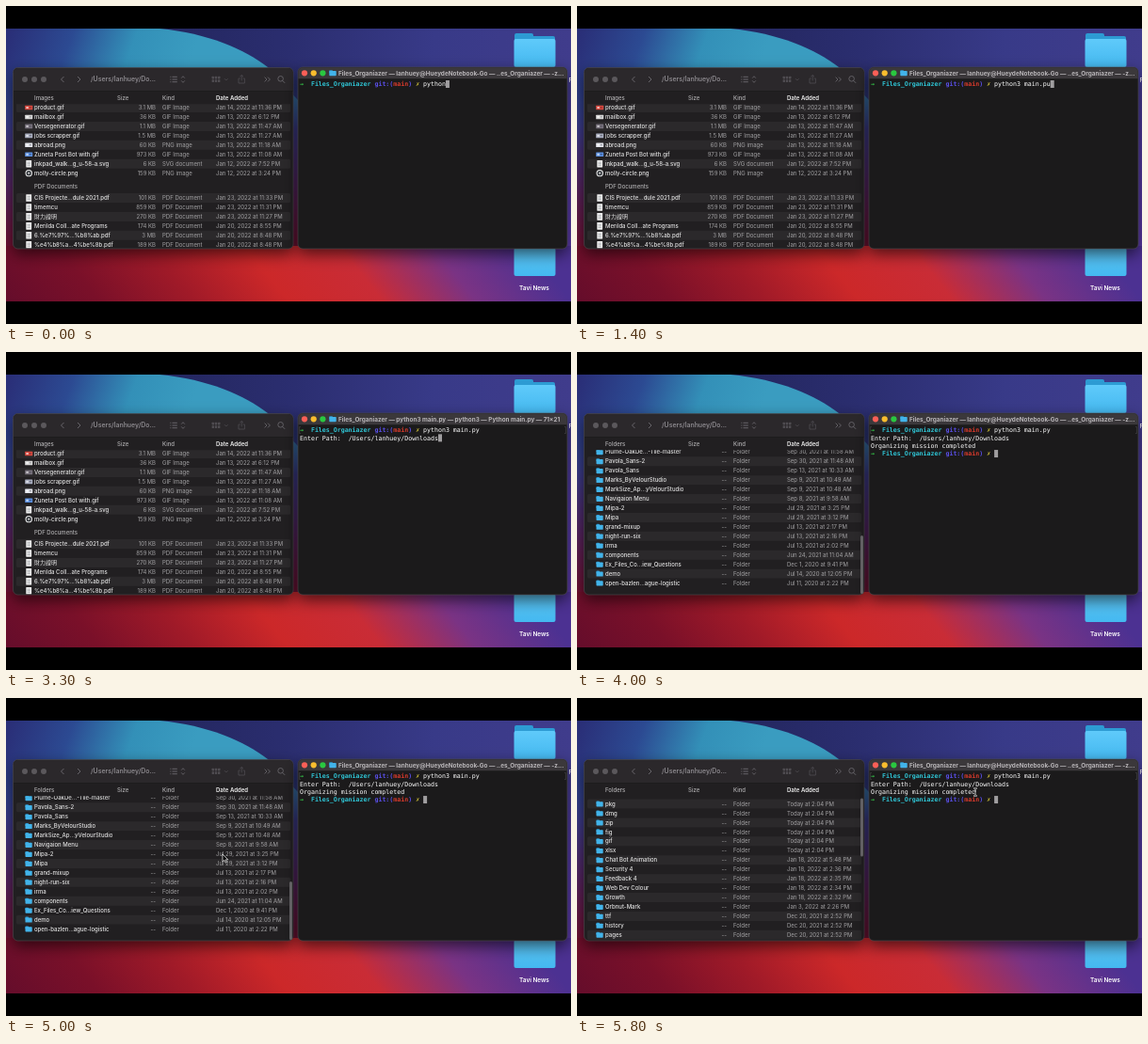
Recreate the animation shown at these times as an HTML page with a canvas. Size 600 by 338 pixels, loop 5.9 s.

```html
<!DOCTYPE html>
<html lang="en">
<head>
<meta charset="utf-8">
<title>Files organizer</title>
<style>
html, body { margin: 0; width: 100%; height: 100%; overflow: hidden; background: #000; }
canvas { display: block; width: 600px; height: 338px; }
</style>
</head>
<body>
<canvas id="stage"></canvas>
<script>
const canvas = document.getElementById('stage'), g = canvas.getContext('2d');
const dpr = window.devicePixelRatio || 1;
canvas.width = 600 * dpr;
canvas.height = 338 * dpr;

const LOOP = 5900, PITCH = 9.95, SCROLL_MAX = 215.2;
const SANS = 'Inter, "Noto Sans CJK TC", "Noto Sans CJK", sans-serif';
const MONO = '"DejaVu Sans Mono", monospace';
const FOLDER = '#42b4ea';

// name | size | kind | date | icon colour
const images = `product.gif|3.1 MB|GIF Image|Jan 14, 2022 at 11:36 PM|#d9473d
mailbox.gif|36 KB|GIF Image|Jan 13, 2022 at 6:12 PM|#d8d8d8
Versegenerator.gif|1.1 MB|GIF Image|Jan 13, 2022 at 11:47 AM|#77717c
jobs scrapper.gif|1.5 MB|GIF Image|Jan 13, 2022 at 11:27 AM|#a9aec0
abroad.png|60 KB|PNG image|Jan 13, 2022 at 11:18 AM|#e6e8ef
Zuneta Post Bot with.gif|973 KB|GIF Image|Jan 13, 2022 at 11:08 AM|#5a8fe0
inkpad_walk...g_u-58-a.svg|6 KB|SVG document|Jan 12, 2022 at 7:52 PM|page
molly-circle.png|159 KB|PNG image|Jan 12, 2022 at 3:24 PM|ring`;
const pdfs = `CIS Projecte...dule 2021.pdf|101 KB|Jan 23, 2022 at 11:33 PM
timemcu|859 KB|Jan 23, 2022 at 11:31 PM
財力證明|270 KB|Jan 23, 2022 at 11:27 PM
Merilda Coll...ate Programs|174 KB|Jan 20, 2022 at 8:55 PM
6.%e7%97%...%b8%ab.pdf|3 MB|Jan 20, 2022 at 8:48 PM
%e4%b8%a...4%be%8b.pdf|189 KB|Jan 20, 2022 at 8:48 PM`;
const folders = `pkg|Today at 2:04 PM
dmg|Today at 2:04 PM
zip|Today at 2:04 PM
fig|Today at 2:04 PM
gif|Today at 2:04 PM
xlsx|Today at 2:04 PM
Chat Bot Animation|Jan 18, 2022 at 5:48 PM
Security 4|Jan 18, 2022 at 2:36 PM
Feedback 4|Jan 18, 2022 at 2:35 PM
Web Dev Colour|Jan 18, 2022 at 2:34 PM
Growth|Jan 18, 2022 at 2:32 PM
Orbnut-Mark|Jan 3, 2022 at 2:26 PM
ttf|Dec 20, 2021 at 2:52 PM
history|Dec 20, 2021 at 2:52 PM
pages|Dec 20, 2021 at 2:52 PM
styles|Dec 20, 2021 at 2:52 PM
assets|Dec 20, 2021 at 2:52 PM
icons|Nov 18, 2021 at 4:10 PM
layout|Nov 2, 2021 at 1:25 PM
drafts|Oct 21, 2021 at 9:40 AM
notes|Oct 8, 2021 at 3:16 PM
Plume-OakDe...-Tile-master|Sep 30, 2021 at 11:58 AM
Pavola_Sans-2|Sep 30, 2021 at 11:48 AM
Pavola_Sans|Sep 13, 2021 at 10:33 AM
Marks_ByVelourStudio|Sep 9, 2021 at 10:49 AM
MarkSize_Ap...yVelourStudio|Sep 9, 2021 at 10:48 AM
Navigaion Menu|Sep 8, 2021 at 9:58 AM
Mipa-2|Jul 29, 2021 at 3:25 PM
Mipa|Jul 29, 2021 at 3:12 PM
grand-mixup|Jul 13, 2021 at 2:17 PM
night-run-six|Jul 13, 2021 at 2:16 PM
irma|Jul 13, 2021 at 2:02 PM
components|Jun 24, 2021 at 11:04 AM
Ex_Files_Co...iew_Questions|Dec 1, 2020 at 9:41 PM
demo|Jul 14, 2020 at 12:05 PM
open-bazlen...ague-logistic|Jul 11, 2020 at 2:22 PM`;
const rows = s => s.split('\n').map(line => line.split('|'));
const imageRows = rows(images), pdfRows = rows(pdfs), folderRows = rows(folders);

const clamp = (v, a = 0, b = 1) => Math.min(b, Math.max(a, v));
const ease = v => { v = clamp(v); return v * v * (3 - 2 * v); };

// y is the optical middle of the line
function text(s, x, y, { size = 6, color = '#dcdcdc', weight = 400, align = 'left', font = SANS } = {}) {
  g.font = `${weight} ${size}px ${font}`;
  g.fillStyle = color;
  g.textAlign = align;
  g.fillText(s, x, y + size * 0.36);
}
function box(x, y, w, h, color, r = 0) {
  g.fillStyle = color;
  g.beginPath();
  g.roundRect(x, y, w, h, r);
  g.fill();
}
function dot(x, y, r, color) {
  g.fillStyle = color;
  g.beginPath();
  g.arc(x, y, r, 0, 7);
  g.fill();
}
function stroke(d, color, width = 0.9) {
  g.strokeStyle = color;
  g.lineWidth = width;
  g.stroke(new Path2D(d));
}
function fillPath(d, color) {
  g.fillStyle = color;
  g.fill(new Path2D(d));
}
function gradient(x0, y0, x1, y1, ...colors) {
  const grad = g.createLinearGradient(x0, y0, x1, y1);
  colors.forEach((c, i) => grad.addColorStop(i / (colors.length - 1), c));
  return grad;
}

function wallpaper() {
  box(0, 0, 600, 338, '#000');
  // sky, then the teal hill, its shaded slope and the red valley
  box(0, 24, 600, 234, gradient(160, 24, 600, 60, '#23265e', '#2b2e70', '#383a88', '#403c8c'));
  box(560, 65, 40, 193, gradient(0, 65, 0, 258, '#403c8c', '#5138a0', '#5a3aa6'));
  fillPath('M0 24H163C215 29 253 46 278 65L310 100V258H0Z',
    gradient(10, 10, 190, 75, '#2a2f78', '#2c4a92', '#3390b8', '#3a9cc0'));
  box(0, 66, 310, 192, gradient(0, 66, 0, 258, 'rgba(44,74,146,0)', '#3b3a88', '#55235e', '#701030'));
  box(0, 255, 600, 59, gradient(0, 314, 366, 21,
    '#650d2b', '#7a1029', '#a01a28', '#cc2829', '#c92c36', '#7a3384', '#4c3192'));
}

function bigFolder(y) {
  box(540, y, 20, 12, '#2d9bd3', 2);
  box(540, y + 3, 43, 14, '#2d9bd3', 2);
  box(539.5, y + 6, 44, 30, gradient(0, y + 6, 0, y + 36, '#5fcafa', '#44b8f0'), 2);
}

function desktop() {
  wallpaper();
  bigFolder(29);
  bigFolder(251);
  text('P', 597.5, 79, { size: 6.2, color: '#fff', weight: 500 });
  text('Tavi News', 561, 300, { size: 6.4, color: '#fff', weight: 600, align: 'center' });
}

function windowFrame(x, y, w, h, fill) {
  g.save();
  g.shadowColor = 'rgba(0,0,0,.6)';
  g.shadowBlur = 16 * dpr;
  g.shadowOffsetY = 6 * dpr;
  box(x, y, w, h, fill, 5);
  g.restore();
  g.strokeStyle = '#504c50';
  g.lineWidth = 0.6;
  g.beginPath();
  g.roundRect(x, y, w, h, 5);
  g.stroke();
}

function icon(kind, y) {
  if (kind === 'folder') {
    box(20.5, y - 3, 3.5, 3, '#2d9bd3', 0.6);
    box(20.5, y - 2.2, 7.2, 5.2, FOLDER, 0.7);
  } else if (kind === 'page') {
    box(21.3, y - 3.8, 5.8, 7.6, '#f1f1f1', 0.4);
    stroke(`M22.5 ${y - 1.6}h3.4m-3.4 1.6h3.4m-3.4 1.6h3.4`, '#8c9096', 0.6);
  } else if (kind === 'ring') {
    dot(24.2, y, 3.7, '#ececec');
    dot(24.2, y, 2.6, '#30343a');
    dot(24.2, y, 1.1, '#c9c9c9');
  } else {
    box(20.2, y - 2.3, 8, 4.6, kind, 0.5);
    box(21.4, y - 0.9, 2.4, 1.8, 'rgba(255,255,255,.65)');
    box(24.6, y - 0.5, 2.4, 0.9, 'rgba(30,30,40,.5)');
  }
}

function fileRow(i, y, name, size, kind, date, pic) {
  if (y < 98 || y > 264) return;
  if (i % 2 === 0) box(11, y - PITCH / 2, 291, PITCH, '#2b292b', 1.5);
  icon(pic, y);
  text(name, 30, y, { weight: 500, color: '#e2e2e2' });
  const gray = { color: '#a3a2a4' };
  text(size, 159, y, { ...gray, align: 'right' });
  text(kind, 166, y, gray);
  text(date, 223, y, gray);
}

function toolbar() {
  const c = '#6f6c72', dim = '#4f4c51';
  [20, 30, 40].forEach(x => dot(x, 78, 3, '#5b585c'));
  stroke('M61.5 75l-3 3 3 3', c);
  stroke('M76 75l3 3-3 3', c);
  text('/Users/lanhuey/Do...', 90, 78, { size: 6.9, weight: 600, color: '#8a878c' });
  stroke('M174.3 75.3h1m1.2 0h5.3M174.3 78h1m1.2 0h5.3M174.3 80.7h1m1.2 0h5.3', c);
  stroke('M186.2 76.6l1.8-1.9 1.8 1.9M186.2 79.4l1.8 1.9 1.8-1.9', c, 0.8);
  for (let i = 0; i < 6; i++) box(218.6 + i % 3 * 3.2, 74.8 + (i / 3 | 0) * 3.5, 2.4, 2.6, dim, 0.4);
  stroke('M232 77.2l1.8 1.8 1.8-1.8', dim, 0.8);
  stroke('M248.6 77h-1.6v5h6.4v-5h-1.6M250.2 79.4v-6m-1.8 1.8l1.8-1.8 1.8 1.8', dim, 0.8);
  stroke('M274.6 75.6l2.4 2.4-2.4 2.4M278 75.6l2.4 2.4-2.4 2.4', c, 0.8);
  g.strokeStyle = c;
  g.beginPath();
  g.arc(291.6, 77.3, 2.8, 0, 7);
  g.stroke();
  stroke('M293.7 79.4l2.4 2.4', c);
}

function finder(organized, scroll) {
  windowFrame(7.5, 65.5, 297.5, 192.5, '#211f21');
  box(8, 66, 296.5, 25, '#2b282b', [5, 5, 0, 0]);
  box(8, 90.5, 296.5, 0.6, '#111');
  toolbar();

  g.save();
  g.beginPath();
  g.rect(8, 104.3, 296.5, 153.2);
  g.clip();
  if (organized) {
    folderRows.forEach(([name, date], i) =>
      fileRow(i, 112.5 + i * PITCH - scroll, name, '--', 'Folder', date, 'folder'));
    box(301, 106.5 + scroll / SCROLL_MAX * 88.5, 3, 62, '#6d6b6e', 1.5);
  } else {
    imageRows.forEach((r, i) => fileRow(i, 108 + i * PITCH, ...r));
    text('PDF Documents', 30, 192, { color: '#b0afb1', weight: 500 });
    pdfRows.forEach(([name, size, date], i) =>
      fileRow(i, 204 + i * PITCH, name, size, 'PDF Document', date, 'page'));
  }
  g.restore();

  const head = { color: '#b0afb1', weight: 500 };
  text(organized ? 'Folders' : 'Images', 30, 98, head);
  text('Size', 118, 98, head);
  text('Kind', 166, 98, head);
  text('Date Added', 223, 98, { color: '#f0f0f0', weight: 600 });
}

const COL = 3.973, lineY = n => 83 + n * 8.35;
function mono(s, col, line, color = '#fff', weight = 400) {
  text(s, 312 + col * COL, lineY(line), { size: 6.6, color, weight, font: MONO });
}
function prompt(line) {
  mono('→', 0, line, '#35c84a', 700);
  mono('Files_Organiazer', 3, line, '#2fc3d3', 700);
  mono('git:(', 20, line, '#5a4fe8', 700);
  mono('main', 25, line, '#d63a2c', 700);
  mono(')', 29, line, '#5a4fe8', 700);
  mono('✗', 31, line, '#d2c13a', 700);
}

function command(t) {
  if (t < 1500) return 'python3 main.pu'.slice(0, 6 + Math.floor(t / 140));
  return t < 1700 ? 'python3 main.p' : 'python3 main.py';
}

function terminal(t) {
  const started = t >= 2100, done = t >= 3600;
  windowFrame(310, 65, 286, 193, '#1b1a1b');
  box(310.3, 65.3, 285.4, 12, '#3b383b', [5, 5, 0, 0]);
  ['#fb5f57', '#f9bd2e', '#2ac840'].forEach((c, i) => dot(317 + i * 9.7, 71.3, 3.1, c));
  box(343.3, 68.2, 3.6, 3, '#2d9bd3', 0.6);
  box(343.3, 69, 7.4, 5.3, FOLDER, 0.7);
  const title = started && !done
    ? 'python3 main.py — python3 — Python main.py — 71×21'
    : 'lanhuey@HueydeNotebook-Go — ..es_Organiazer — -z...';
  text('Files_Organiazer — ' + title, 353, 71.3, { size: 6.4, weight: 700, color: '#b9b6b9' });

  const cmd = command(t), path = t >= 2900 ? '/Users/lanhuey/Downloads' : '';
  let col = 33 + cmd.length, line = 0;
  prompt(0);
  mono(cmd, 33, 0);
  if (started) {
    stroke('M313 79.5h-1.4v7h1.4M593 79.5h1.4v7h-1.4', '#4c4a4c', 0.6);
    mono('Enter Path:', 0, 1);
    mono(path, 13, 1);
    col = 13 + path.length;
    line = 1;
  }
  if (done) {
    mono('Organizing mission completed', 0, 2);
    prompt(3);
    col = 33;
    line = 3;
  }
  box(312 + col * COL, lineY(line) - 4, 4, 8, '#a09ea0');
}

function pointer(t) {
  if (t < 4400) return;
  const arrive = ease((t - 4400) / 400), leave = ease((t - 5400) / 400);
  const x = 262 - 32 * arrive + 193 * leave, y = 182 - 16 * arrive - 66 * leave;
  g.save();
  g.translate(x, y);
  if (x > 311) {
    const beam = 'M-1.8-4Q0-4 0-2.6Q0-4 1.8-4M0-2.8V2.8M-1.8 4Q0 4 0 2.6Q0 4 1.8 4M-1 1h2';
    stroke(beam, '#fff', 1.7);
    stroke(beam, '#111', 0.7);
  } else {
    const arrow = 'M0 0V8L1.9 6.3 3.2 9.2 4.5 8.6 3.3 5.8H5.8Z';
    fillPath(arrow, '#000');
    stroke(arrow, '#fff', 0.7);
  }
  g.restore();
}

function draw(now) {
  const t = Math.floor(now % LOOP / 100) * 100;
  g.setTransform(dpr, 0, 0, dpr, 0, 0);
  desktop();
  finder(t >= 3600, SCROLL_MAX * (1 - ease((t - 5000) / 400)));
  terminal(t);
  pointer(t);
  box(0, 314, 600, 24, '#000');
}

const start = performance.now();
function tick() {
  draw(performance.now() - start);
  requestAnimationFrame(tick);
}
tick();
</script>
</body>
</html>
```
